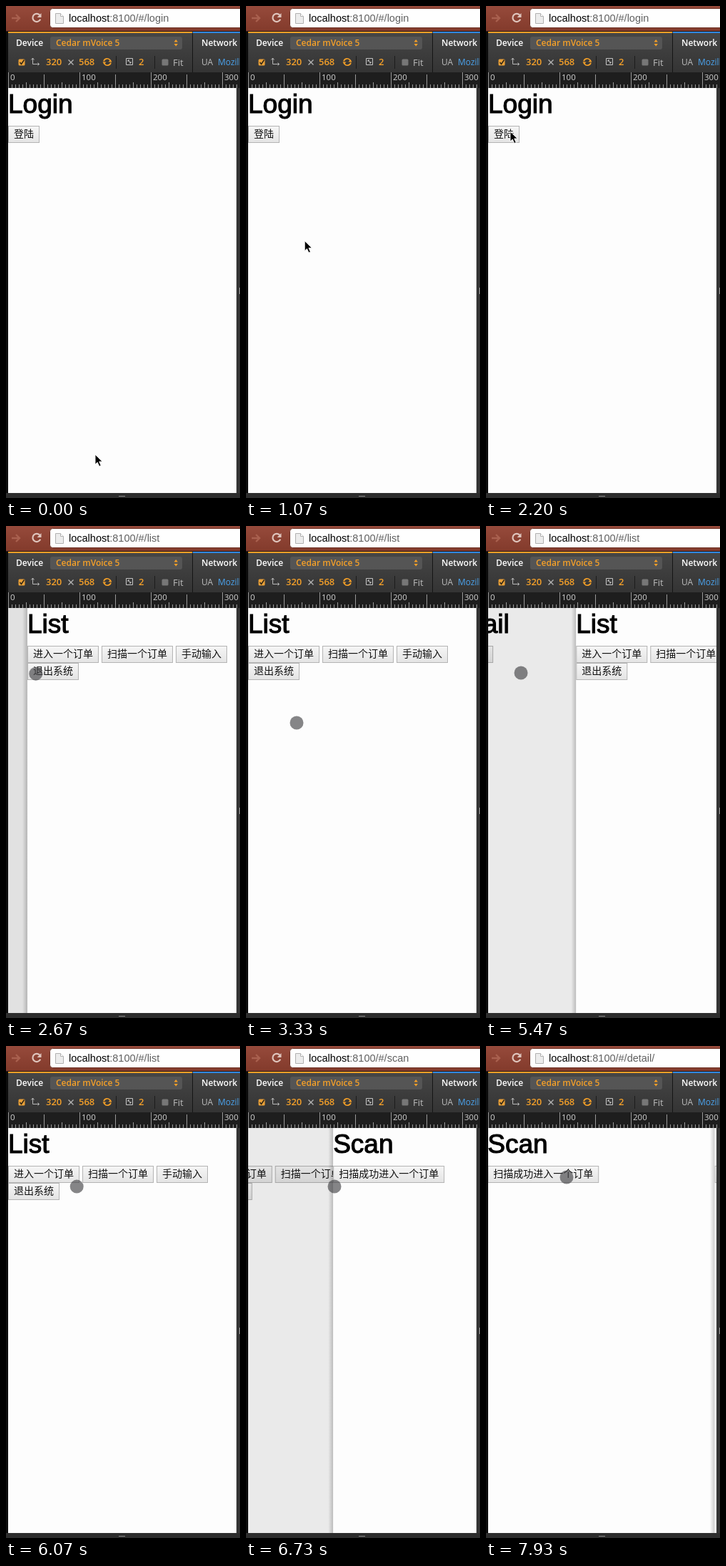
Recreate the animation shown at these times as an HTML page. Size 328 by 690 pixels, loop 8 s.

```html
<!DOCTYPE html>
<html lang="zh">
<head>
<meta charset="utf-8">
<title>Page transitions</title>
<style>
  html, body { margin: 0; width: 100%; height: 100%; overflow: hidden; background: #2d2d2d; }
  svg { display: block; }
  text { white-space: pre; }
  .url { font: 14.5px "Liberation Sans", Arial, sans-serif; }
  .ui { font: 12px "Open Sans", "Noto Sans", sans-serif; }
  .strong { font-weight: 600; }
  .num { font-size: 13px; font-weight: 600; }
  .ruler { font: 11.5px "Open Sans", "Noto Sans", sans-serif; fill: #d4d4d4; }
  .title { font: 37px "Liberation Sans", Arial, sans-serif; stroke: #000; stroke-width: 1.1; }
  .label { font: 14px "Noto Sans CJK SC", "Noto Sans CJK", sans-serif; fill: #111; }
  .crisp { shape-rendering: crispEdges; }
</style>
</head>
<body>
<svg id="stage" width="328" height="690" viewBox="0 0 328 690">
  <defs>
    <linearGradient id="bar" x2="0" y2="1">
      <stop stop-color="#964a3b"/><stop offset="1" stop-color="#823a2b"/>
    </linearGradient>
    <linearGradient id="panel" x2="0" y2="1">
      <stop stop-color="#474747"/><stop offset="1" stop-color="#343434"/>
    </linearGradient>
    <linearGradient id="face" x2="0" y2="1">
      <stop stop-color="#f6f6f6"/><stop offset="1" stop-color="#e4e4e4"/>
    </linearGradient>
    <linearGradient id="edge">
      <stop stop-opacity="0"/><stop offset="1" stop-opacity=".2"/>
    </linearGradient>
    <clipPath id="view"><rect x="3" y="115" width="320" height="568"/></clipPath>
  </defs>

  <!-- address bar -->
  <rect width="328" height="36" fill="url(#bar)"/>
  <path d="M8 17h11m-5-5 5 5-5 5" fill="none" stroke="#a9604f" stroke-width="2.4"/>
  <path d="M47.6 13.2A5.6 5.6 0 1 0 48.2 18.6" fill="none" stroke="#dfc5bd" stroke-width="2.2"/>
  <path d="M49.5 10v6h-6z" fill="#dfc5bd"/>
  <rect x="61.5" y="3.5" width="280" height="27" rx="4" fill="#fefefe" stroke="#6d3226"/>
  <path d="M69.5 10.5h7l4 4v10h-11z" fill="#ececec" stroke="#b0b0b0"/>
  <path d="M76.5 10.5v4h4" fill="#fff" stroke="#b0b0b0"/>
  <text class="url" x="88" y="22">localhost<tspan id="path" fill="#606060"></tspan></text>

  <!-- device toolbar -->
  <rect y="35" width="328" height="58" fill="url(#panel)"/>
  <g class="crisp">
    <rect y="35" width="328" height="1" fill="#261a18"/>
    <rect x="3" y="36" width="258" height="2" fill="#ed9f26"/>
    <rect x="262" y="36" width="66" height="2" fill="#3088e0"/>
    <rect x="261" y="38" width="1" height="55" fill="#151515"/>
    <path d="M154.5 70v18M208.5 70v18" stroke="#1c1c1c"/>
  </g>
  <rect x="62" y="43" width="185" height="18" rx="3" fill="#555"/>
  <g class="ui">
    <text class="strong" x="14" y="56" fill="#fff">Device</text>
    <text class="strong" x="70" y="56" fill="#f5a028">Cedar mVoice 5</text>
    <text class="strong" x="274" y="56" fill="#fff">Network</text>
    <g class="num" fill="#f5a028">
      <text x="56" y="83">320</text><text x="102" y="83">568</text><text x="186" y="83">2</text>
    </g>
    <g fill="#bdbdbd">
      <text x="234" y="84" font-size="13">Fit</text><text x="274" y="83">UA</text>
    </g>
    <text x="297" y="83" fill="#4aa3ee">Mozilla</text>
  </g>
  <path d="M235.5 50.5l2.7-3.5 2.7 3.5zm0 2.500h5.4l-2.7 3.5z" fill="#f5a028"/>
  <rect x="17.5" y="74.5" width="9" height="9" rx="1.5" fill="#e9a038"/>
  <path d="M19.5 79l2 2.500 4-6" fill="none" stroke="#2b2418" stroke-width="1.5"/>
  <path d="M37.5 73v8.500h9M35.5 75.500l2-2.500 2 2.500M44.5 79.500l2 2-2 2" fill="none" stroke="#b8b8b8"/>
  <path d="M87.5 75.500l7 7m0-7l-7 7" stroke="#b8b8b8" stroke-width="1.2"/>
  <path d="M137 77.500a5 5 0 0 1 9-1.500M147 79.500a5 5 0 0 1-9 1.500" fill="none" stroke="#f5a028" stroke-width="1.6"/>
  <path d="M148.5 78.500h-5l3-3.500zM135.5 78.500h5l-3 3.500z" fill="#f5a028"/>
  <path d="M168.5 73.500h9v9h-9zM171 76l4 4m-4-2v-2h2m2 2v2h-2" fill="none" stroke="#c6c6c6"/>
  <rect x="218.5" y="74.500" width="9" height="9" rx="1.5" fill="#777"/>

  <!-- ruler and frame -->
  <rect y="93" width="328" height="22" fill="#1e1e1e"/>
  <path id="ticks" class="crisp" stroke="#999"/>
  <g id="marks" class="ruler"></g>
  <g class="crisp">
    <rect y="36" width="3" height="654" fill="#0c0c0c"/>
    <rect x="323" y="115" width="5" height="575" fill="#353535"/>
    <rect y="683" width="328" height="7" fill="#2d2d2d"/>
    <rect x="158" y="687" width="9" height="1" fill="#8e8e8e"/>
    <rect x="327" y="395" width="1" height="9" fill="#a5a5a5"/>
    <rect x="3" y="115" width="320" height="568" fill="#fdfdfd"/>
  </g>

  <g id="pages" clip-path="url(#view)"></g>
  <circle id="touch" r="9.5" fill="#404043" fill-opacity=".63"/>
  <path id="arrow" d="M0 0v14l3.200-3 2.500 5.600 2.500-1.100-2.500-5.500h4.500z" stroke="#fff" stroke-width=".9"/>
</svg>
<script>
const LOOP = 8000, SLIDE = 500;
const $ = id => document.getElementById(id);

function add(parent, tag, attrs = {}, text = '') {
  const node = document.createElementNS('http://www.w3.org/2000/svg', tag);
  for (const key in attrs) node.setAttribute(key, attrs[key]);
  node.textContent = text;
  return parent.appendChild(node);
}

// Ruler
let ticks = '';
for (let n = 0; n <= 325; n += 5) {
  const top = n % 100 === 0 ? 93 : n % 50 === 0 ? 96 : n % 25 === 0 ? 107 : 110;
  ticks += `M${n + 3.5} ${top}V115`;
  if (n % 100 === 0) add($('marks'), 'text', { x: n + 6, y: 104 }, n);
}
$('ticks').setAttribute('d', ticks);

// Pages: title and buttons as [x, y, label]
const content = {
  login: ['Login', [3, 168, '登陆']],
  list: ['List', [3, 168, '进入一个订单'], [107, 168, '扫描一个订单'],
    [211, 168, '手动输入'], [3, 192, '退出系统']],
  detail: ['Detail', [3, 168, '返回列表']],
  scan: ['Scan', [3, 168, '扫描成功进入一个订单']]
};
const pages = {};
for (const name in content) {
  const [title, ...buttons] = content[name];
  const group = add($('pages'), 'g');
  add(group, 'rect', { x: -4, y: 115, width: 7, height: 568, fill: 'url(#edge)' });
  add(group, 'rect', { x: 3, y: 115, width: 320, height: 568, fill: '#fdfdfd' });
  add(group, 'text', { class: 'title', x: 3, y: 150 }, title);
  for (const [x, y, label] of buttons) {
    add(group, 'rect', { x: x + .5, y: y + .5, width: label.length * 14 + 15, height: 23,
      fill: 'url(#face)', stroke: '#b4b4b4' });
    add(group, 'text', { class: 'label', x: x + 8, y: y + 16 }, label);
  }
  const shade = add(group, 'rect', { x: 3, y: 115, width: 320, height: 568 });
  pages[name] = { group, shade };
}

// Navigation: start time, page, address
const visits = [
  [-SLIDE, 'login', 'login'],
  [2450, 'list', 'list'],
  [3850, 'detail', 'detail/'],
  [5359, 'list', 'list'],
  [6617, 'scan', 'scan'],
  [7929, 'detail', 'detail/']
];

// Pointer: time, x, y
const track = [
  [0, 125, 629], [70, 125, 629], [850, 95, 370], [1600, 34, 176], [2450, 34, 176],
  [2900, 50, 240], [3330, 71, 276], [3450, 71, 276], [3800, 52, 184], [4000, 50, 184],
  [4470, 14, 199], [5000, 38, 186], [5300, 43, 188], [5470, 49, 206], [5900, 90, 202],
  [6400, 124, 184], [6600, 124, 185], [6730, 124, 197], [7300, 113, 184], [LOOP, 113, 184]
];

function pointerAt(t) {
  const i = track.findIndex(k => k[0] > t);
  const [t0, x0, y0] = track[i - 1], [t1, x1, y1] = track[i];
  const k = (t - t0) / (t1 - t0), e = k * k * (3 - 2 * k);
  return [x0 + (x1 - x0) * e, y0 + (y1 - y0) * e];
}

// cubic-bezier(.36, .66, .04, 1)
function ease(x) {
  if (x <= 0) return 0;
  if (x >= 1) return 1;
  const curve = (u, a, b) => 3 * (1 - u) ** 2 * u * a + 3 * (1 - u) * u * u * b + u ** 3;
  let low = 0, high = 1;
  for (let i = 0; i < 20; i++) {
    const mid = (low + high) / 2;
    if (curve(mid, .36, .04) < x) low = mid; else high = mid;
  }
  return curve(low, .66, 1);
}

function place(name, x, dim) {
  const { group, shade } = pages[name];
  group.style.display = '';
  group.setAttribute('transform', `translate(${x.toFixed(2)} 0)`);
  shade.setAttribute('opacity', dim);
}

function draw(t) {
  const index = visits.findLastIndex(v => v[0] <= t);
  const [start, name, address] = visits[index];
  const p = ease((t - start) / SLIDE);
  for (const key in pages) pages[key].group.style.display = 'none';
  if (p < 1) {
    const previous = visits[index - 1][1];
    place(previous, -105.6 * p, .12 * p);
    $('pages').append(pages[name].group);
  }
  place(name, 320 * (1 - p), 0);
  $('path').textContent = ':8100/#/' + address;

  const [x, y] = pointerAt(t), touching = t >= 2450;
  $('arrow').style.display = touching ? 'none' : '';
  $('touch').style.display = touching ? '' : 'none';
  $(touching ? 'touch' : 'arrow').setAttribute('transform', `translate(${x} ${y})`);
}

const began = performance.now();
function tick() {
  draw((performance.now() - began) % LOOP);
  requestAnimationFrame(tick);
}
tick();
</script>
</body>
</html>
```
